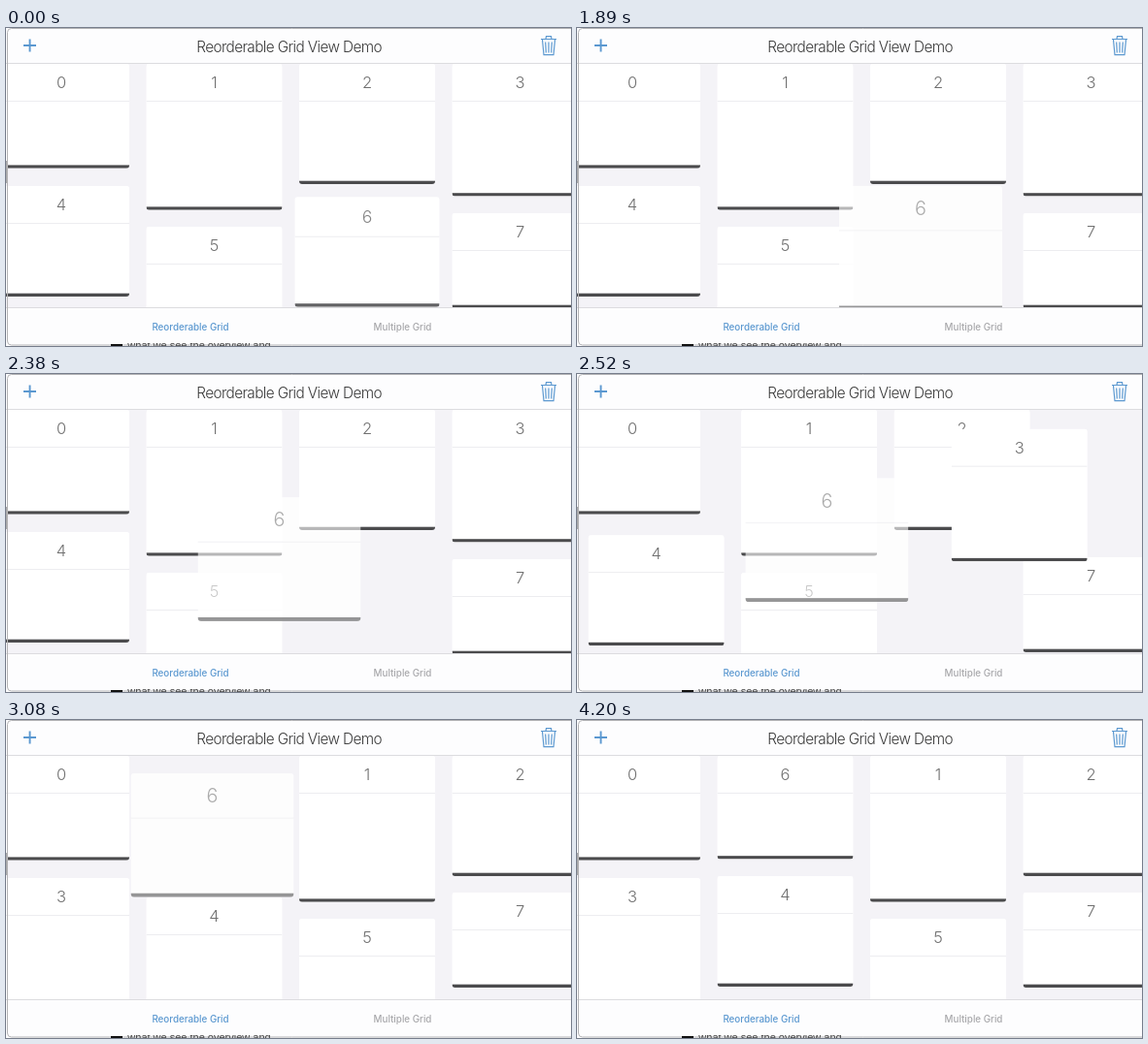
An HTML page with a canvas that plays this animation: 582x328 px, repeating every 5.81 s.

```html
<!DOCTYPE html>
<html lang="en">
<head>
<meta charset="utf-8">
<title>Reorderable Grid View Demo</title>
<style>
  html, body { margin: 0; width: 100%; height: 100%; overflow: hidden; background: #fff; }
  canvas { display: block; }
</style>
</head>
<body>
<canvas id="stage" width="582" height="328"></canvas>
<script>
const ctx = document.getElementById('stage').getContext('2d');
const LOOP = 5810, STEP = 70;
const W = 582, H = 328, CARD_W = 140, HEADER = 38.5;
const BLUE = '#5b98d0', LINE = '#dcdcdf', BAR_BG = '#fdfdfe';
const columnX = col => -13 + 157.5 * col;

// Resting places before and after the reorder: [column, top]
const cards = [
  { label: 0, h: 107.7, from: [0, 37],  to: [0, 37] },
  { label: 1, h: 150.7, from: [1, 37],  to: [2, 37] },
  { label: 2, h: 124,   from: [2, 37],  to: [3, 37] },
  { label: 5, h: 130,   from: [1, 205], to: [2, 205] },
  { label: 7, h: 98,    from: [3, 191], to: [3, 178] },
  { label: 4, h: 114,   from: [0, 163], to: [1, 183], settled: 161 },
  { label: 3, h: 136.5, from: [3, 37],  to: [0, 163] }
];
const dragged = { label: 6, h: 106.5 };
const HOME = [372, 231], DROP = [214.5, 90.2];

// Drag path: [time, centre x, centre y]
const path = [
  [1890, 354, 226.6],
  [2380, 281.5, 191],
  [2730, 225.5, 139.7],
  [3080, 212.5, 118.8],
  [3220, 207, 118.6]
];

const clamp01 = v => Math.min(1, Math.max(0, v));
const lerp = (a, b, p) => a + (b - a) * p;
const smooth = p => p * p * (3 - 2 * p);
const progress = (t, start, end) => smooth(clamp01((t - start) / (end - start)));

function slope(i, axis) {
  const a = path[Math.max(0, i - 1)], b = path[Math.min(path.length - 1, i + 1)];
  return (b[axis] - a[axis]) / (b[0] - a[0]);
}

function dragPoint(t) {
  if (t < path[0][0]) return HOME;
  const last = path[path.length - 1];
  if (t >= last[0]) return [last[1], last[2]];
  const i = path.findIndex(p => p[0] > t) - 1;
  const span = path[i + 1][0] - path[i][0], u = (t - path[i][0]) / span;
  return [1, 2].map(axis =>
    lerp(path[i][axis], path[i + 1][axis], smooth(u)) +
    span * u * (1 - u) * ((1 - u) * slope(i, axis) - u * slope(i + 1, axis)));
}

function text(str, x, y, font, color, spacing = 0) {
  ctx.font = font;
  ctx.fillStyle = color;
  ctx.letterSpacing = spacing + 'px';
  ctx.textAlign = 'center';
  ctx.textBaseline = 'alphabetic';
  ctx.fillText(str, x, y);
}

function rect(x, y, w, h, color) {
  ctx.fillStyle = color;
  ctx.fillRect(x, y, w, h);
}

function drawCard({ label, h }, x, y, scale = 1, alpha = 1) {
  ctx.save();
  ctx.translate(x, y);
  ctx.scale(scale, scale);
  ctx.globalAlpha = alpha;
  ctx.beginPath();
  ctx.roundRect(0, 0, CARD_W, h, 3);
  ctx.clip();
  rect(0, 0, CARD_W, h, '#fff');
  // Pale tints under a see-through card wash out to white
  ctx.globalCompositeOperation = 'color-dodge';
  rect(0, 0, CARD_W, h, '#0a0a0a');
  ctx.globalCompositeOperation = 'source-over';
  rect(0, HEADER - 0.5, CARD_W, 1, '#ededf0');
  rect(0, h - 3.3, CARD_W, 3.3, '#4b4b4d');
  text(label, CARD_W / 2, 25.3, '300 16.5px Inter, sans-serif', '#707070');
  ctx.restore();
}

function drawDragged(t) {
  const lift = 0.325 + 0.675 * Math.sin(clamp01(t / 210) * Math.PI / 2);
  const drop = progress(t, 3430, 3780);
  const amount = lift * (1 - drop), scale = 1 + 0.2 * amount;
  const [px, py] = dragPoint(t);
  const cx = lerp(px, DROP[0], drop), cy = lerp(py, DROP[1], drop);
  drawCard(dragged, cx - CARD_W / 2 * scale, cy - dragged.h / 2 * scale,
    scale, 1 - 0.42 * amount);
}

function drawTrash() {
  ctx.strokeStyle = BLUE;
  ctx.lineWidth = 1.2;
  ctx.beginPath();
  ctx.moveTo(551, 11.5); ctx.lineTo(567, 11.5);
  ctx.moveTo(556, 11); ctx.lineTo(556.5, 8.7); ctx.lineTo(561.5, 8.7); ctx.lineTo(562, 11);
  ctx.moveTo(552.5, 12); ctx.lineTo(554, 27.7); ctx.lineTo(564, 27.7); ctx.lineTo(565.5, 12);
  for (const i of [-1, 0, 1]) {
    ctx.moveTo(559 + i * 3.3, 14.5);
    ctx.lineTo(559 + i * 2.7, 25.5);
  }
  ctx.stroke();
}

function drawChrome() {
  rect(0, 0, W, 36, BAR_BG);
  rect(0, 36, W, 1, LINE);
  rect(0, 288, W, 40, BAR_BG);
  rect(0, 288, W, 1, LINE);

  rect(18, 17, 13, 2, BLUE);
  rect(23.6, 11.5, 1.9, 13, BLUE);
  drawTrash();
  text('Reorderable Grid View Demo', 291.6, 24.7, '300 15.3px Inter, sans-serif', '#3a3a3a', -0.6);
  const tabFont = '500 9.8px Inter, sans-serif';
  text('Reorderable Grid', 190, 311.6, tabFont, BLUE);
  text('Multiple Grid', 408.5, 311.6, tabFont, '#a8a8ab');

  // Window edge with a sliver of the page behind it
  ctx.strokeStyle = '#b4b4b6';
  ctx.lineWidth = 1;
  ctx.beginPath();
  ctx.roundRect(1.5, 0.5, W + 8, 326.5, 4);
  ctx.stroke();
  rect(0, 137, 1, 23, '#aaa');
  ctx.save();
  ctx.beginPath();
  ctx.rect(100, 325, 180, 3);
  ctx.clip();
  rect(108, 326, 12, 2, '#111');
  text('what we see the overview and', 199, 331, '11px "Liberation Sans", Arial, sans-serif', '#444');
  ctx.restore();
}

function draw(t) {
  rect(0, 0, W, H, '#f4f3f7');
  const move = progress(t, 2450, 2730), settle = progress(t, 3430, 3780);
  for (const card of cards) {
    const { from, to, settled = to[1] } = card;
    const top = lerp(lerp(from[1], to[1], move), settled, settle);
    drawCard(card, columnX(lerp(from[0], to[0], move)), top);
  }
  drawDragged(t);
  drawChrome();
}

const start = performance.now();
function tick() {
  const t = (performance.now() - start) % LOOP;
  draw(Math.floor(t / STEP) * STEP);
  requestAnimationFrame(tick);
}
tick();
</script>
</body>
</html>
```
